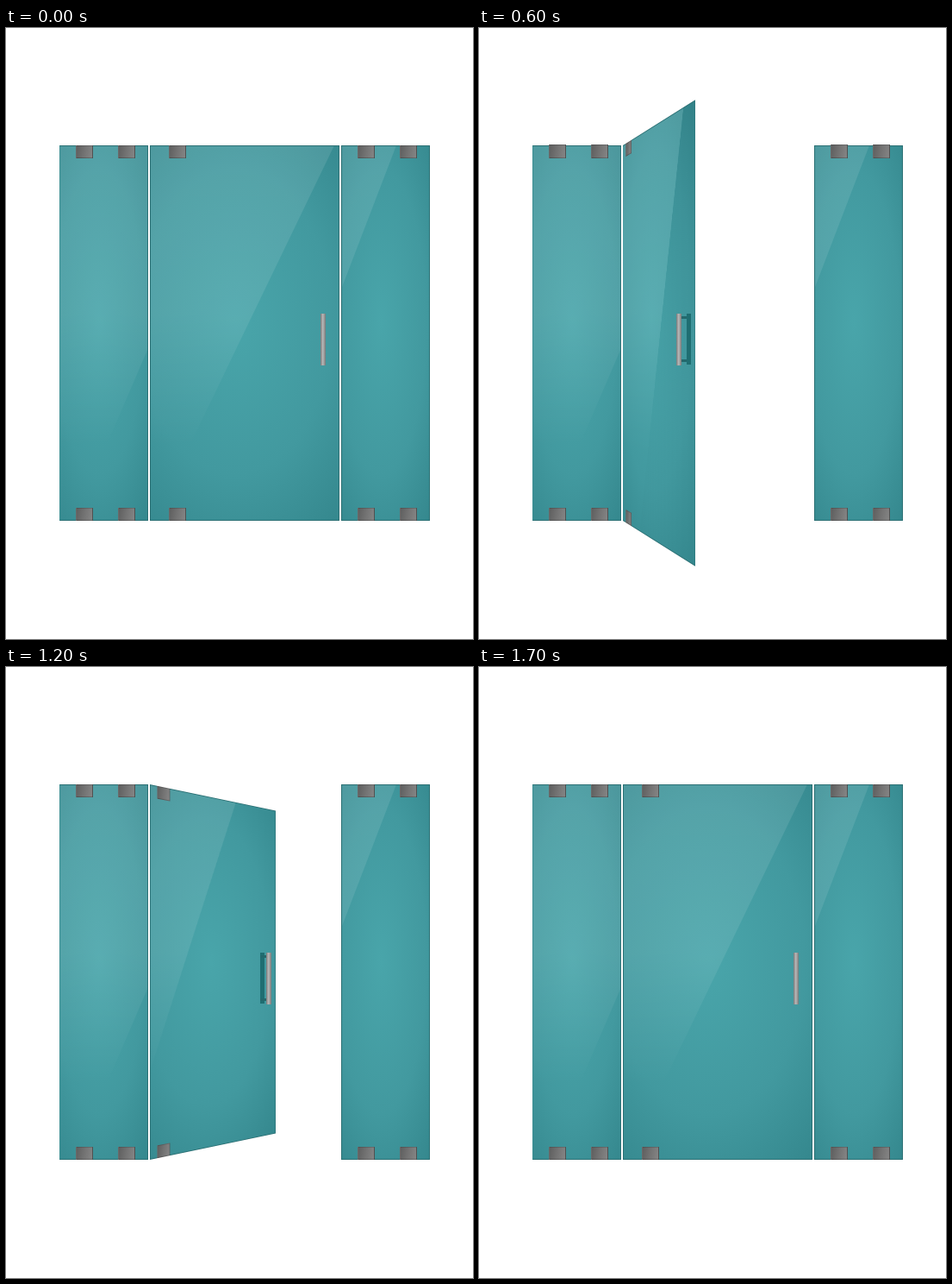
An HTML page for the animation above (1800 ms loop, 542 px wide and 708 px high).

```html
<!DOCTYPE html>
<html>
<head>
<meta charset="utf-8">
<title>Glass door</title>
<style>
  html, body { margin: 0; width: 100%; height: 100%; overflow: hidden; background: #fff; }
  div { position: absolute; box-sizing: border-box; }
  #stage { left: 0; top: 0; width: 542px; height: 708px; }
  .glass {
    top: 136px; width: 103px; height: 435px; overflow: hidden;
    background: radial-gradient(ellipse 85% 68% at 45% 47%, #49a5aa, #42999f 60%, #35888e);
  }
  .glass::after { content: ""; position: absolute; inset: 0; border: 1px solid #2b7074; }
  .left::after { border-left-color: #3b8e92; }
  #door { left: 167px; width: 220px; transform-origin: 0 50%; }
  .gloss, .shade { inset: 0; }
  .gloss {
    background: linear-gradient(#ffffff1a, #ffffff17 45%, #fff0 80%);
    clip-path: polygon(-200px 0, var(--t) 0, var(--b) 100%, -200px 100%);
  }
  .shade {
    background: linear-gradient(#00303a, #00303a80 35%, #00303a20 70%);
    clip-path: polygon(var(--t) 0, 100% 0, 100% 100%, var(--b) 100%);
  }
  .cap {
    width: 20px; height: 15px; z-index: 1;
    background: linear-gradient(100deg, #5f5f5f, #737373 50%, #858585);
    border: 1px solid #00000030;
  }
  .top { top: 0; }
  .bottom { bottom: 0; }
  .out .side .top { top: -1px; height: 16px; }
  .side { overflow: visible; }
  .side .gloss { z-index: 0; }
  #bar {
    top: 331px; width: 6px; height: 60px;
    background: linear-gradient(90deg, #777, #b5b5b5 40%, #a0a0a0 70%, #747474);
  }
  #back { top: 331px; width: 5px; height: 59px; background: #1f6e72; }
  .pin { height: 3px; background: #23696d; }
</style>
</head>
<body>
<div id="stage">
  <div class="glass side left" style="left:62px">
    <div class="gloss" style="--t:204px;--b:17px"></div>
  </div>
  <div class="glass side" style="left:389px">
    <div class="gloss" style="--t:64px;--b:-103px"></div>
  </div>
  <div class="glass" id="door">
    <div class="shade"></div>
    <div class="gloss"></div>
  </div>
  <div id="back"></div>
  <div class="pin" style="top:334px"></div>
  <div class="pin" style="top:384px"></div>
  <div id="bar"></div>
</div>
<script>
const $ = q => document.querySelector(q);
const stage = $('#stage'), door = $('#door'), bar = $('#bar'), back = $('#back');
const pins = document.querySelectorAll('.pin');
const W = 220, HINGE = 167;

function addCaps(panel, ...xs) {
  for (const x of xs) for (const end of ['top', 'bottom']) {
    const cap = document.createElement('div');
    cap.className = 'cap ' + end;
    cap.style.left = x + 'px';
    panel.append(cap);
  }
}
const [leftPanel, rightPanel] = document.querySelectorAll('.side');
addCaps(leftPanel, 19, 68);
addCaps(rightPanel, 19, 68);
addCaps(door, 22);
const doorCaps = door.querySelectorAll('.cap');

// free edge x, edge scale, bar x, bar-to-back distance, gloss top and bottom, shade
const poses = {
  closed: [387, 1, 365, 0, 214, 4, 0],
  out1: [374, 1.107, 348, 5, 214, 4, 0],
  out2: [309, 1.2115, 281, 11, 214, 14, 0],
  out3: [251, 1.243, 229, 12, 190, 60, .1],
  out4: [211, 1.257, 194, 11, 146, 115, .4],
  in1: [360, .916, 345, -4, 175, -30, 0],
  in2: [313, .86, 302, -7, 143, -44, 0],
  in3: [260, .83, 252, -8, 125, -55, 0]
};
// one pose per 100 ms
const steps = ('closed out1 out2 out3 out4 out4 out3 out2 out1 closed closed ' +
  'in1 in2 in3 in2 in2 in1 closed').split(' ');

function show(name) {
  const [edge, scale, barX, gap, t, b, shade] = poses[name];
  const stretch = (edge - HINGE) / (W * scale), depth = (1 / scale - 1) / W;
  door.style.transform = name === 'closed' ? 'none' :
    `matrix3d(${stretch},0,0,${depth}, 0,1,0,0, 0,0,1,0, 0,0,0,1)`;
  door.style.setProperty('--t', t + 'px');
  door.style.setProperty('--b', b + 'px');
  $('.shade').style.opacity = shade;
  for (const cap of doorCaps) cap.style.left = (name === 'closed' ? 22 : 11) + 'px';
  stage.classList.toggle('out', scale > 1);
  bar.style.left = barX + 'px';
  back.style.left = barX + gap + 'px';
  back.style.visibility = gap ? 'visible' : 'hidden';
  for (const pin of pins) {
    pin.style.left = barX + Math.min(gap, 0) + 'px';
    pin.style.width = Math.abs(gap) + 'px';
  }
}

const start = performance.now();
let shown;
function tick() {
  const name = steps[Math.floor((performance.now() - start) % 1800 / 100)];
  if (name !== shown) show(shown = name);
  requestAnimationFrame(tick);
}
tick();
</script>
</body>
</html>
```
